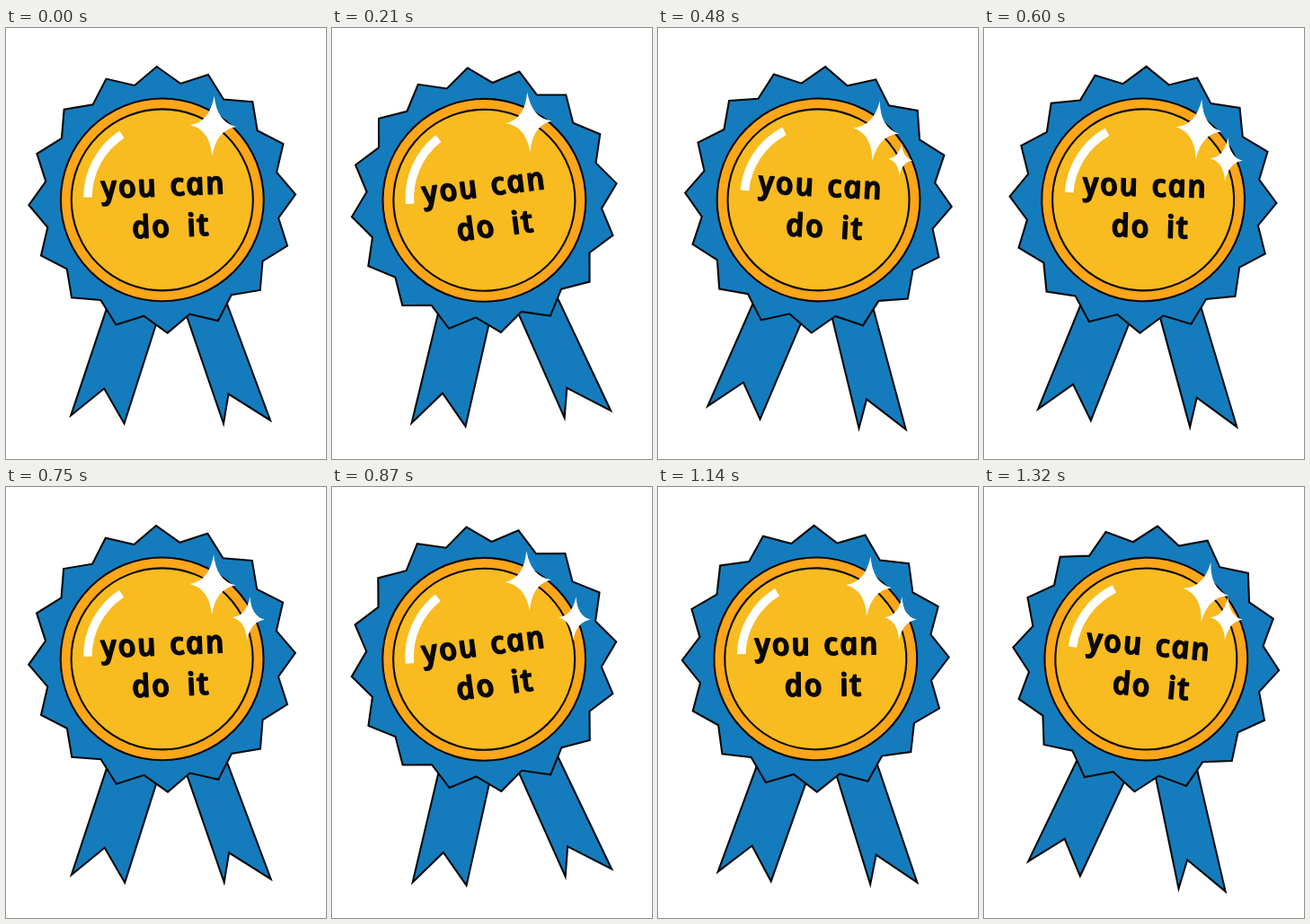
Write an HTML page that moves like this. It is 356 by 480 pixels and loops after 1620 ms.

```html
<!DOCTYPE html>
<html lang="en">
<head>
<meta charset="utf-8">
<title>you can do it</title>
<style>
  html, body { margin: 0; width: 100%; height: 100%; overflow: hidden; background: #fff; }
  svg { display: block; width: 100vw; height: 100vh; }
  .line { stroke: #08090a; stroke-width: 2.1; stroke-miterlimit: 8; }
  .blue { fill: #147cbd; }
  text {
    font: italic 600 35px "Open Sans", "Noto Sans", sans-serif;
    letter-spacing: 1.6px;
    word-spacing: 3px;
    text-anchor: middle;
    fill: #080808;
    stroke: #080808;
    stroke-width: 1.5;
    stroke-linejoin: round;
  }
</style>
</head>
<body>
<svg viewBox="0 0 356 480">
  <g id="badge">
    <path class="line blue" d="M122.8 280 72.2 431.5 109.2 401.5 131.5 440.5 183 280Z"/>
    <path class="line blue" d="M187 280 242 440.5 247.5 407.5 294 437 235.8 280Z"/>
    <path class="line blue" id="rosette"/>
    <circle class="line" cx="173.8" cy="191.4" r="112.9" fill="#fca61a"/>
    <circle class="line" cx="173.8" cy="191.4" r="101" fill="#f8bb20"/>
    <path d="M91 188.5A84 84 0 0 1 128.9 118.5" fill="none" stroke="#fff" stroke-width="9.6"/>
    <!-- the skew sets the italic letterforms upright -->
    <text transform="translate(177.5 187) rotate(-2.3) skewX(12)">you can</text>
    <text transform="translate(186 232.5) rotate(-2.3) skewX(12)" style="word-spacing: 7px">do it</text>
    <path id="glint" fill="#fff" transform="translate(230.5 109) rotate(2)"/>
  </g>
  <path id="twinkle" fill="#fff"/>
</svg>
<script>
  const LOOP = 1620, STEP = 30, LAST = 1320;
  const $ = id => document.getElementById(id);

  // time in ms, swing in degrees
  const swing = [
    [0, 0], [120, -7.8], [210, -4.9], [360, .6], [510, 5.9], [600, 3.7],
    [750, -.2], [870, -5.2], [990, -1.4], [1080, 0], [1320, 7.25]
  ];

  function rosette(cx, cy, tips, outer, inner, turn) {
    const points = Array.from({ length: tips * 2 }, (_, i) => {
      const a = i * Math.PI / tips + turn * Math.PI / 180;
      const r = i % 2 ? inner : outer;
      return (cx + r * Math.sin(a)).toFixed(2) + ' ' + (cy - r * Math.cos(a)).toFixed(2);
    });
    return 'M' + points.join('L') + 'Z';
  }

  function star(w, h) {
    const x = w * .15, y = h * .13;
    return `M0 ${-h}Q${x} ${-y} ${w} 0Q${x} ${y} 0 ${h}Q${-x} ${y} ${-w} 0Q${-x} ${-y} 0 ${-h}Z`;
  }

  function slope(keys, i) {
    const a = keys[Math.max(i - 1, 0)], b = keys[Math.min(i + 1, keys.length - 1)];
    return (b[1] - a[1]) / (b[0] - a[0]);
  }

  // cubic Hermite curve through the keys
  function curve(keys, t) {
    let i = 0;
    while (i < keys.length - 2 && t > keys[i + 1][0]) i++;
    const [t0, v0] = keys[i], [t1, v1] = keys[i + 1];
    const d = t1 - t0, u = (t - t0) / d, n = 1 - u;
    return v0 * (1 + 2 * u) * n * n + v1 * u * u * (3 - 2 * u)
      + d * u * n * (n * slope(keys, i) - u * slope(keys, i + 1));
  }

  function draw(now) {
    const t = Math.min(Math.floor((now % LOOP) / STEP) * STEP, LAST);
    const size = Math.min(Math.max((t - 210) / 360, 0), 1);
    $('badge').setAttribute('transform', `rotate(${curve(swing, t)} 176 243)`);
    $('twinkle').setAttribute('transform', `translate(269.8 146.6) rotate(4) scale(${size})`);
  }

  $('rosette').setAttribute('d', rosette(173.7, 191.3, 16, 148.4, 131, -2.3));
  $('glint').setAttribute('d', star(25.5, 33.5));
  $('twinkle').setAttribute('d', star(18, 24.5));

  const start = performance.now();
  function tick() {
    draw(performance.now() - start);
    requestAnimationFrame(tick);
  }
  tick();
</script>
</body>
</html>
```
